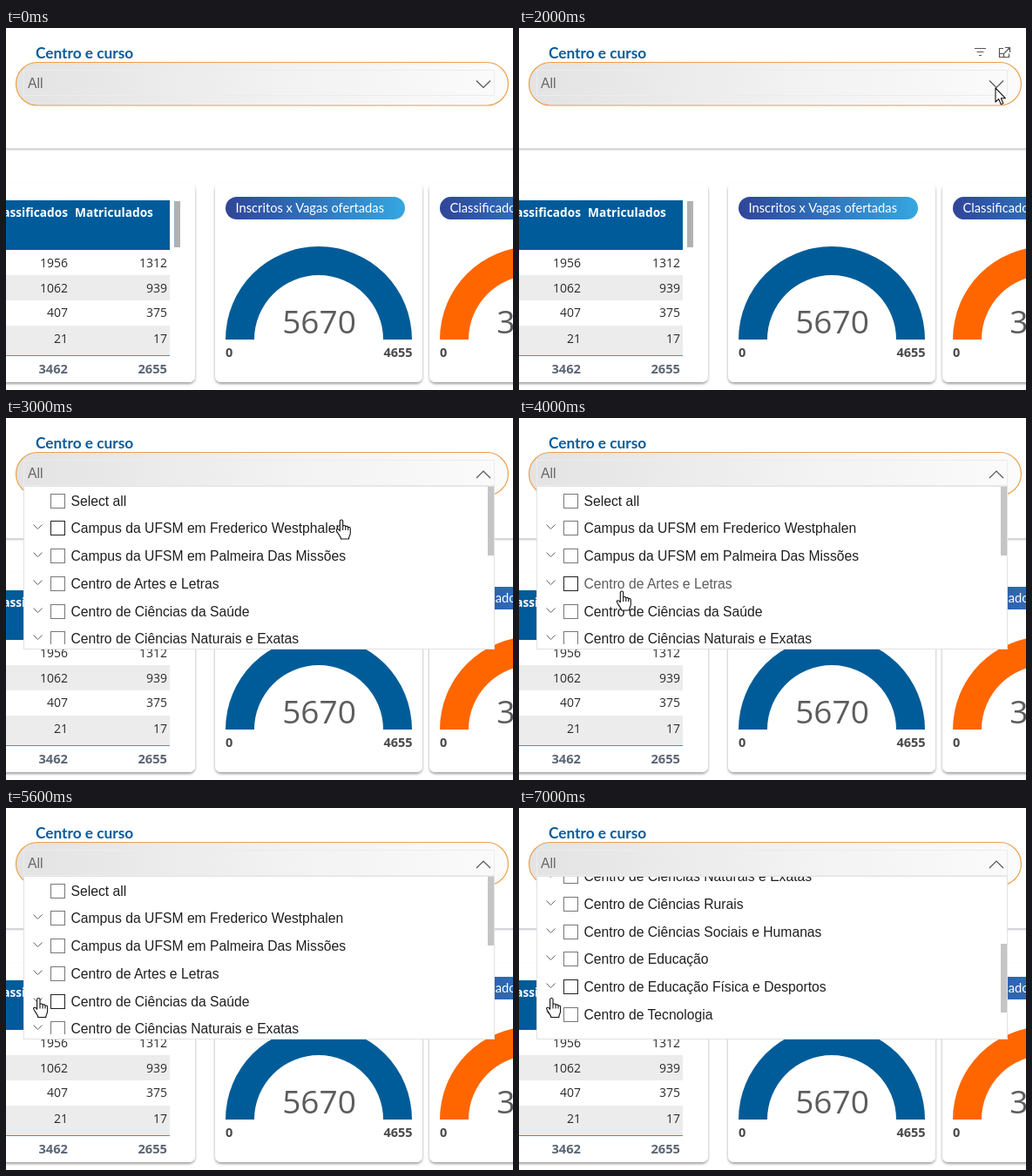
Animation, 582 px wide and 416 px high, one loop 8000 ms. Source, as an HTML page:

```html
<!DOCTYPE html>
<html lang="pt">
<head>
<meta charset="utf-8">
<style>
  html, body { margin: 0; width: 100%; height: 100%; overflow: hidden; background: #fff; }
  svg { display: block; width: 582px; height: 416px; }
  .ui { font-family: "Open Sans", "Noto Sans", sans-serif; }
  .title { font-family: Lato, sans-serif; }
  .list { font-family: "Liberation Sans", Arial, sans-serif; font-size: 15.7px; }
  .bold { font-weight: 700; }
  .end { text-anchor: end; }
  .line { fill: none; stroke: #555; stroke-width: 1.2; }
  .thin { fill: none; stroke: #666; }
</style>
</head>
<body>
<svg id="stage" viewBox="0 0 582 416">
  <defs>
    <linearGradient id="pill">
      <stop offset="0" stop-color="#30459a"/>
      <stop offset=".35" stop-color="#2e66b2"/>
      <stop offset="1" stop-color="#35a7e0"/>
    </linearGradient>
    <linearGradient id="field">
      <stop offset="0" stop-color="#e3e3e3"/>
      <stop offset=".55" stop-color="#f2f2f2"/>
      <stop offset="1" stop-color="#fbfbfb"/>
    </linearGradient>
    <filter id="shadow" x="-10%" y="-10%" width="120%" height="120%">
      <feDropShadow dx="0" dy="2" stdDeviation="1.8" flood-color="#000" flood-opacity=".38"/>
    </filter>
    <clipPath id="view"><rect x="21" y="79" width="532" height="181"/></clipPath>
  </defs>
  <rect width="582" height="416" fill="#fff"/>
  <rect y="138" width="582" height="2.5" fill="#d5d7db"/>

  <text class="title bold" x="34" y="35" font-size="17.3" fill="#0b5c9c">Centro e curso</text>
  <g id="icons" class="line">
    <path d="M523 23.5h13M525.5 27.5h8M528 31.5h3"/>
    <path d="M556 23.5h-4.5v10h11v-4M558 22.5h5.500v5.500M563 23l-6 6M551.500 29.500h5v4"/>
  </g>
  <rect x="11.5" y="39.5" width="565" height="49.5" rx="24.7" fill="url(#field)" stroke="#eba04a" stroke-width="1.2"/>
  <rect x="20.500" y="48.500" width="540" height="29" fill="none" stroke="#ececec"/>
  <text class="list" x="25" y="69" fill="#666">All</text>
  <path id="arrow" class="line"/>

  <g id="cards"></g>

  <g id="popup">
    <rect x="20.5" y="78.5" width="540" height="187" fill="#fff" stroke="#e2e2e2"/>
    <g clip-path="url(#view)"><g id="rows"></g></g>
    <rect id="thumb" x="553" y="79" width="7" height="79" fill="#c5c5c5"/>
  </g>

  <g id="cursor" fill="#fff" stroke="#111" stroke-width="1.1" stroke-linejoin="round">
    <path id="pointer" d="M0 0V16L3.700 12.600 6.300 18.700 8.900 17.600 6.300 11.700H11.300Z"/>
    <path id="hand" d="M-1.700 1.500C-1.700-.5 1.700-.5 1.700 1.500V7.500C2 6 4.700 6.200 4.800 8 5.500 6.800 7.600 7.200 7.700 9 8.500 8 10.300 8.500 10.300 10.300V15C10.300 18 8.500 18.500 8.500 22H-.5C-.5 19-5.500 14.500-5.700 12-5.500 10-3 10.500-1.700 12.800Z M1.700 7.500V12M4.800 8V12M7.700 9V12"/>
  </g>
</svg>
<script>
const $ = id => document.getElementById(id);
const LOOP = 8000;
const labels = ['Select all', 'Campus da UFSM em Frederico Westphalen',
  'Campus da UFSM em Palmeira Das Missões', 'Centro de Artes e Letras',
  'Centro de Ciências da Saúde', 'Centro de Ciências Naturais e Exatas',
  'Centro de Ciências Rurais', 'Centro de Ciências Sociais e Humanas',
  'Centro de Educação', 'Centro de Educação Física e Desportos', 'Centro de Tecnologia'];
const rowY = i => Math.round(94.7 + i * 31.7);

const text = (x, y, size, str, cls, fill) =>
  `<text x="${x}" y="${y}" font-size="${size}" class="${cls}" fill="${fill}">${str}</text>`;
const rect = (x, y, w, h, fill, more = '') =>
  `<rect x="${x}" y="${y}" width="${w}" height="${h}" fill="${fill}" ${more}/>`;
const card = (x, w) => rect(x, 178, w, 229, '#fff', 'rx="7" filter="url(#shadow)"');

function table() {
  const rows = [[275, 1956, 1312], [304, 1062, 939], [332, 407, 375], [362, 21, 17]];
  const pair = (y, a, b, size, cls, fill) =>
    text(71, y, size, a, cls, fill) + text(185, y, size, b, cls, fill);
  return card(-40, 257)
    + rect(0, 198, 188, 57, '#005b9b')
    + text(71, 217, 13.7, 'Classificados', 'ui bold end', '#fff')
    + text(79, 217, 13.7, 'Matriculados', 'ui bold', '#fff')
    + rect(193, 199, 7, 53, '#b1b1b1')
    + rect(0, 284, 188, 29, '#ececec') + rect(0, 342, 188, 34, '#ececec')
    + rect(0, 376, 188, 1, '#4a8fc7')
    + rows.map(([y, a, b]) => pair(y, a, b, 14, 'ui end', '#2b2b2b')).join('')
    + pair(397, 3462, 2655, 14.7, 'ui bold end', '#5b6675');
}

function gauge(x, title, value, max, color) {
  return card(x - 12, 238)
    + rect(x, 194, 206, 26, 'url(#pill)', 'rx="13"')
    + text(x + 11.5, 212, 14.7, title, 'title', '#fff')
    + `<path d="M${x} 358a107 107 0 0 1 214 0h-33a74 74 0 0 0-148 0z" fill="${color}"/>`
    + `<text x="${x + 107.5}" y="351" font-size="37" class="ui" text-anchor="middle" fill="#5c5c5c">${value}</text>`
    + text(x, 377.5, 14.5, 0, 'ui bold', '#484848')
    + text(x + 214.5, 377.5, 14.5, max, 'ui bold end', '#484848');
}

$('cards').innerHTML = table()
  + gauge(252, 'Inscritos x Vagas ofertadas', 5670, 4655, '#005c98')
  + gauge(498, 'Classificados', 3462, 4655, '#ff6600');

$('rows').innerHTML = labels.map((label, i) =>
  `<g transform="translate(0 ${rowY(i)})">`
    + (i ? '<path class="thin" d="M31.500-3.500l5 5 5-5"/>' : '')
    + '<rect class="box" x="51.5" y="-7.5" width="16" height="16" fill="#fff"/>'
    + `<text class="list" x="74.5" y="6">${label}</text></g>`
).join('');
const rows = [...$('rows').children].map(g => ({
  box: g.querySelector('.box'), label: g.querySelector('text')
}));

// time, x, y of the pointer tip
const path = [[1500, 590, 180], [2000, 547, 69], [2350, 547, 69], [3000, 385, 117],
  [3200, 385, 117], [4000, 118, 199], [4150, 118, 199], [4900, 37.3, 218.5]];
const ease = p => (p = Math.min(1, Math.max(0, p)), p * p * (3 - 2 * p));

function tipAt(t) {
  let [, x, y] = path[0];
  for (let i = 1; i < path.length; i++) {
    const [t0, x0, y0] = path[i - 1], [t1, x1, y1] = path[i];
    const p = ease((t - t0) / (t1 - t0));
    x += (x1 - x0) * p;
    y += (y1 - y0) * p;
  }
  return [x, y];
}

const show = (id, on) => $(id).style.display = on ? '' : 'none';

function draw(t) {
  const open = t >= 2200;
  const [x, y] = tipAt(t);
  const scroll = Math.round(95 * ease((t - 5820) / 180) + 80 * ease((t - 6320) / 230));
  const onList = open && y > 79;

  show('popup', open);
  show('icons', y < 90);
  show('cursor', t >= 1500);
  show('hand', onList);
  show('pointer', !onList);
  $('cursor').setAttribute('transform', `translate(${x.toFixed(1)} ${y.toFixed(1)})`);
  $('arrow').setAttribute('d', open ? 'M540 69l8-8 8 8' : 'M540 60.500l8 8 8-8');
  $('rows').setAttribute('transform', `translate(0 ${-scroll})`);
  $('thumb').setAttribute('y', Math.round(79 + scroll * .44));

  rows.forEach(({ box, label }, i) => {
    const gap = Math.abs(y - (rowY(i) - scroll));
    const hover = onList && gap < 16;
    const overText = hover && gap <= 9 && x > 74 && x < 370;
    box.setAttribute('stroke', hover ? '#222' : '#777');
    label.setAttribute('fill', overText ? '#5c5c5c' : '#1f1f1f');
  });
}

const start = performance.now();
function tick() {
  draw((performance.now() - start) % LOOP);
  requestAnimationFrame(tick);
}
tick();
</script>
</body>
</html>
```
